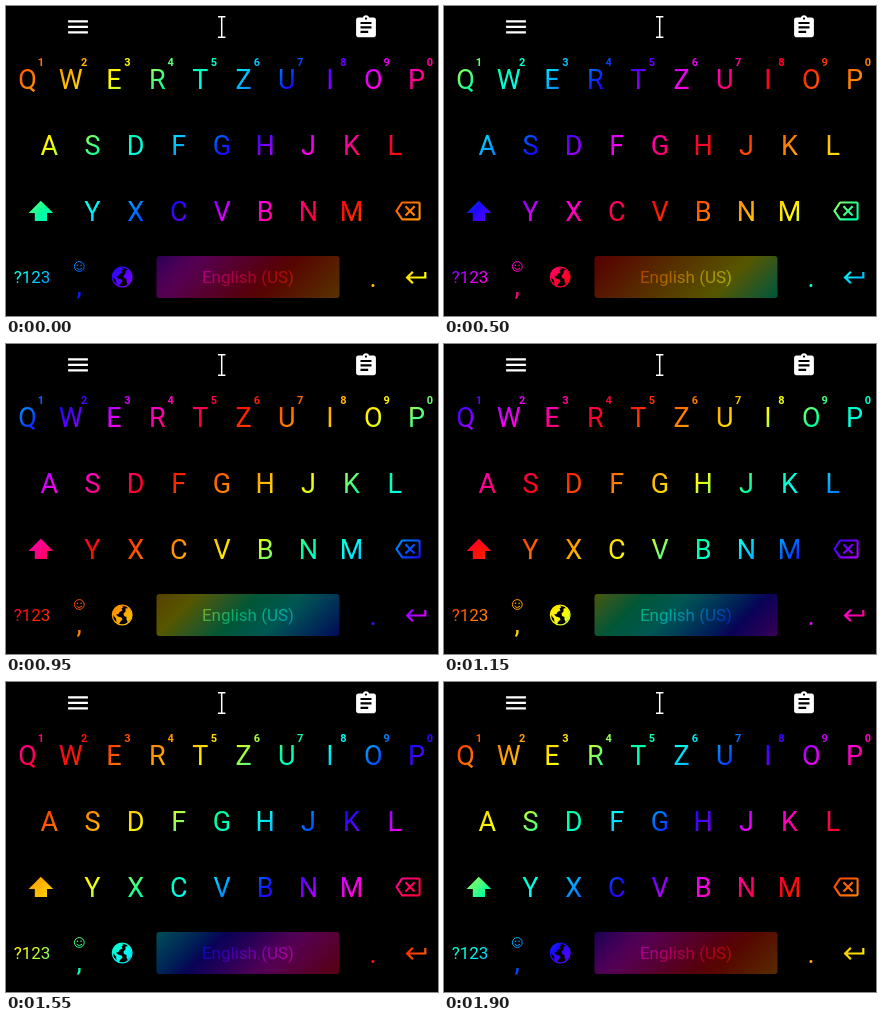
Recreate the animation shown at these times as an HTML page. Size 432 px wide and 310 px high, loop 1.95 s.

```html
<!DOCTYPE html>
<html lang="en">
<head>
<meta charset="utf-8">
<title>Rainbow keyboard</title>
<style>
  html, body { margin: 0; width: 100%; height: 100%; overflow: hidden; background: #000; }
  svg { display: block; width: 432px; height: 310px; }
  text { font-family: Roboto, "Open Sans", sans-serif; text-anchor: middle; }
  .key { font-size: 27px; }
  .hint { font-size: 11px; font-weight: 700; }
  .label { font-size: 17px; }
</style>
</head>
<body>
<svg viewBox="0 0 432 310">
  <defs>
    <linearGradient id="rainbow" gradientUnits="userSpaceOnUse" spreadMethod="repeat"
      x1="0" y1="0" x2="255" y2="255"></linearGradient>
    <clipPath id="icons">
      <path transform="translate(389.2 192.2) scale(1.06)" d="M22 3H7c-.69 0-1.23.35-1.59.88L0 12l5.41 8.11c.36.53.9.89 1.59.89h15c1.1 0 2-.9 2-2V5c0-1.1-.9-2-2-2zm0 16H7.07L2.4 12l4.66-7H22v14zm-11.59-2L14 13.41 17.59 17 19 15.59 15.41 12 19 8.41 17.59 7 14 10.59 10.41 7 9 8.41 12.59 12 9 15.59z"/>
      <path transform="translate(397.3 258.3) scale(1.1)" d="M19 7v4H5.83l3.58-3.59L8 6l-6 6 6 6 1.41-1.41L5.83 13H21V7z"/>
    </clipPath>
  </defs>

  <g fill="#fff">
    <path transform="translate(58.8 7.7) scale(1.1)" d="M3 6h18v2H3zM3 11h18v2H3zM3 16h18v2H3z"/>
    <path transform="translate(346.8 8.2) scale(1.1)" d="M19 3h-4.18C14.4 1.84 13.3 1 12 1c-1.3 0-2.4.84-2.82 2H5c-1.1 0-2 .9-2 2v14c0 1.1.9 2 2 2h14c1.1 0 2-.9 2-2V5c0-1.1-.9-2-2-2zm-7 0c.55 0 1 .45 1 1s-.45 1-1 1-1-.45-1-1 .45-1 1-1zm2 14H7v-2h7v2zm3-4H7v-2h10v2zm0-4H7V7h10v2z"/>
    <path d="M212 10.7h7.4M212 31.3h7.4M215.7 10.7v20.6" fill="none" stroke="#fff" stroke-width="1.5"/>
  </g>

  <g id="keys" fill="url(#rainbow)">
    <rect x="150.5" y="250" width="183" height="42" rx="3" opacity=".34"/>
    <text class="label" x="242" y="277" opacity=".5">English (US)</text>
    <text class="label" x="26" y="277">?123</text>
    <text class="key" x="73.2" y="288.5">,</text>
    <text class="key" x="367" y="281">.</text>
    <rect x="380" y="190" width="50" height="95" clip-path="url(#icons)"/>
    <path d="M34.8 194.8L47.2 207H41V215H28.8V207H22.6z"/>
    <g fill="none" stroke="url(#rainbow)">
      <circle cx="73.3" cy="260.5" r="4.9"/>
      <path d="M70.6 262.2Q73.3 265.2 76 262.2"/>
      <circle cx="116.2" cy="271" r="9.8" stroke-width="1.3"/>
    </g>
    <circle cx="71.5" cy="259.2" r=".8"/>
    <circle cx="75.1" cy="259.2" r=".8"/>
    <path d="M107 267.5C108.500 263.500 111.500 261.500 115 261.300L117.500 263 115.500 264.500 116.500 266.500 113.500 268 112.500 270 110 270.500 112 272.500 115.500 273.500 116.500 275.500 114 278 113 280.500 110.500 278 110 274.500 107 271z"/>
    <path d="M119.500 264.500L123 264 125.800 269.500 125.500 274 123.500 276.500 122 278.500 120.500 275.500 120.500 273 118 272 117.500 269.500 119.500 267.500z"/>
  </g>
</svg>
<script>
  const NS = "http://www.w3.org/2000/svg";
  const LOOP = 1950, STEP = 50, PERIOD = 510, START = 180;
  const rainbow = document.getElementById("rainbow");
  const keys = document.getElementById("keys");

  function add(parent, tag, attrs, text = "") {
    const el = document.createElementNS(NS, tag);
    for (const name in attrs) el.setAttribute(name, attrs[name]);
    el.textContent = text;
    parent.append(el);
  }

  // Distance along the diagonal, then colour
  const stops = [
    [0, "#ffff00"], [38, "#6aff70"], [62, "#00ffa0"], [105, "#00fff0"],
    [130, "#00beff"], [166, "#0055ff"], [186, "#1a08ff"], [215, "#6800ff"],
    [248, "#d800ff"], [270, "#ff00eb"], [305, "#ff008c"], [345, "#ff0028"],
    [368, "#ff1400"], [430, "#ff7d00"], [PERIOD, "#ffff00"]
  ];
  for (const [at, color] of stops)
    add(rainbow, "stop", { offset: at / PERIOD, "stop-color": color });

  const rows = [["QWERTZUIOP", 21.6, 82.6], ["ASDFGHJKL", 43.2, 148.6], ["YXCVBNM", 86.4, 214.6]];
  for (const [letters, left, y] of rows)
    [...letters].forEach((c, i) => add(keys, "text", { class: "key", x: left + 43.2 * i, y }, c));
  [..."1234567890"].forEach((c, i) =>
    add(keys, "text", { class: "hint", x: 35 + 43.2 * i, y: 59.5 }, c));

  function draw() {
    const step = Math.floor((performance.now() % LOOP) / STEP);
    const shift = (START - PERIOD * step * STEP / LOOP) / 2;
    rainbow.setAttribute("gradientTransform", `translate(${shift} ${shift})`);
    requestAnimationFrame(draw);
  }
  draw();
</script>
</body>
</html>
```
